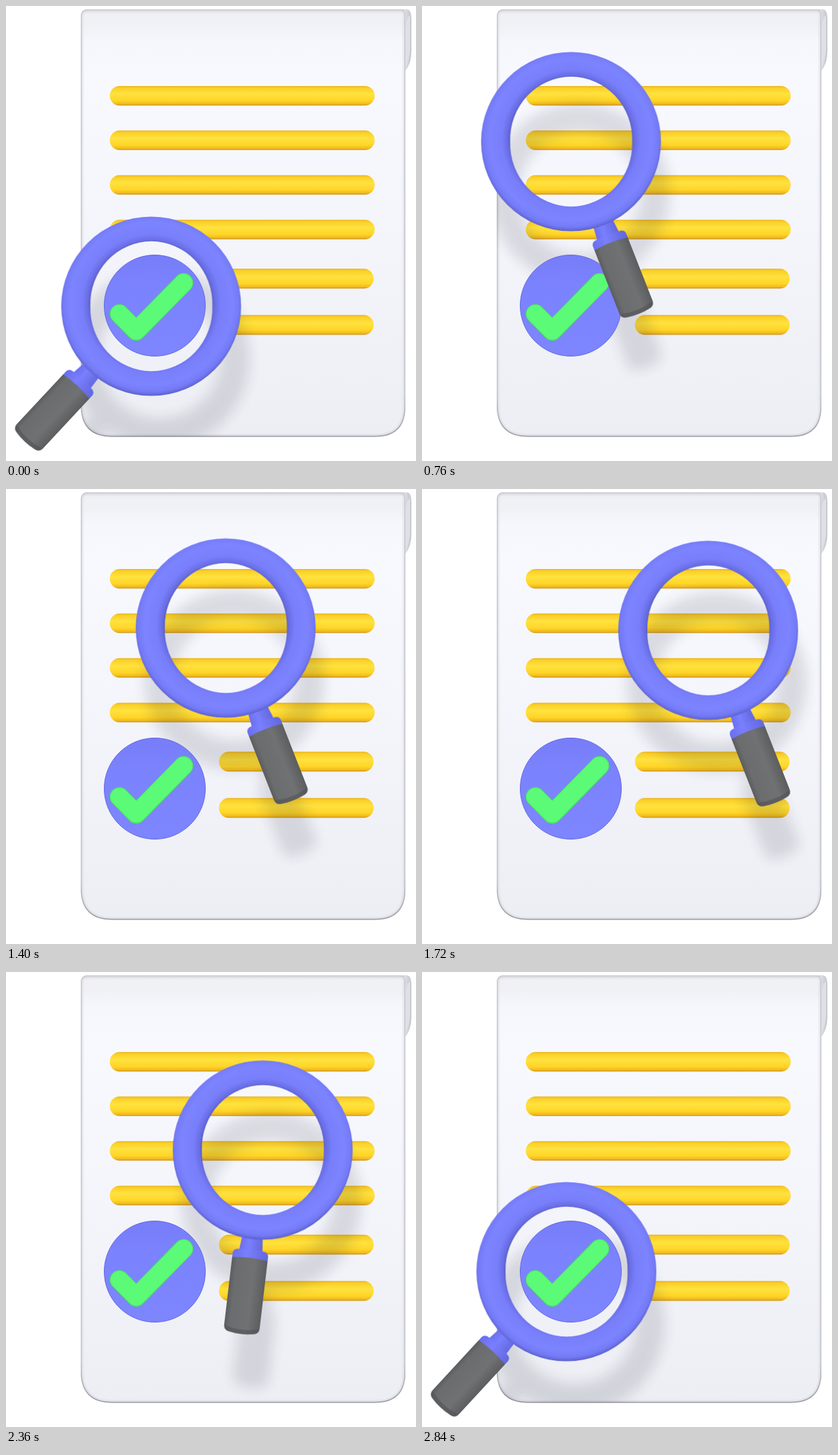
Write an HTML page that moves like this. It is 620x688 px and loops after 2880 ms.

```html
<!DOCTYPE html>
<html lang="en">
<head>
<meta charset="utf-8">
<title>Document check</title>
<style>
  html, body { margin: 0; width: 100%; height: 100%; overflow: hidden; background: #fff; }
  svg { display: block; width: 100%; height: 100%; }

  .x, .y, .turn { animation: 2880ms linear infinite; transform-origin: 0 0; }
  .x { animation-name: slide; }
  .y { animation-name: lift; }
  .turn { animation-name: turn; }

  @keyframes slide {
    0%      { transform: translateX(219.5px); animation-timing-function: cubic-bezier(.5, 0, .6, 1); }
    24.65%  { transform: translateX(225px); animation-timing-function: cubic-bezier(.615, 0, .6, 1); }
    66.667% { transform: translateX(448px); animation-timing-function: cubic-bezier(.65, 0, .6, 1); }
    100%    { transform: translateX(217.5px); }
  }
  @keyframes lift {
    0%      { transform: translateY(454px); animation-timing-function: cubic-bezier(.6, 0, .6, 1); }
    24.65%  { transform: translateY(205px); animation-timing-function: cubic-bezier(.5, 0, .6, 1); }
    66.667% { transform: translateY(214.3px); animation-timing-function: cubic-bezier(.7, 0, .6, 1); }
    100%    { transform: translateY(454px); }
  }
  @keyframes turn {
    0%      { transform: rotate(43deg); animation-timing-function: cubic-bezier(.36, 0, .64, 1); }
    24.65%  { transform: rotate(-21.4deg); }
    66.667% { transform: rotate(-21.4deg); animation-timing-function: cubic-bezier(.36, 0, .64, 1); }
    100%    { transform: rotate(43deg); }
  }
</style>
</head>
<body>
<svg viewBox="0 0 620 688">
  <defs>
    <linearGradient id="paper" x2="0" y2="1">
      <stop offset="0" stop-color="#e2e3e8"/>
      <stop offset=".012" stop-color="#f0f0f5"/>
      <stop offset=".035" stop-color="#f0f1f6"/>
      <stop offset=".075" stop-color="#f6f7fc"/>
      <stop offset=".16" stop-color="#f8f9fe"/>
      <stop offset=".55" stop-color="#f4f5fb"/>
      <stop offset="1" stop-color="#eceef4"/>
    </linearGradient>
    <linearGradient id="rim" x2="0" y2="1">
      <stop offset="0" stop-color="#cbccd2"/>
      <stop offset=".9" stop-color="#c6c7cd"/>
      <stop offset="1" stop-color="#a2a3aa"/>
    </linearGradient>
    <linearGradient id="roll">
      <stop offset="0" stop-color="#b4b5bd"/>
      <stop offset=".5" stop-color="#dddee4"/>
      <stop offset="1" stop-color="#c4c5cc"/>
    </linearGradient>
    <linearGradient id="yellow" x2="0" y2="1">
      <stop offset="0" stop-color="#e8b422"/>
      <stop offset=".1" stop-color="#fbcf26"/>
      <stop offset=".4" stop-color="#ffe23f"/>
      <stop offset=".75" stop-color="#ffd527"/>
      <stop offset=".92" stop-color="#f0b91f"/>
      <stop offset="1" stop-color="#c9921e"/>
    </linearGradient>
    <radialGradient id="torus" gradientUnits="userSpaceOnUse" cx="0" cy="-4" r="140">
      <stop offset=".64" stop-color="#5458bc"/>
      <stop offset=".69" stop-color="#6a6fe6"/>
      <stop offset=".75" stop-color="#797ffb"/>
      <stop offset=".88" stop-color="#7d84ff"/>
      <stop offset=".95" stop-color="#757bf6"/>
      <stop offset="1" stop-color="#5b60cb"/>
    </radialGradient>
    <linearGradient id="disc" x2="0" y2="1">
      <stop offset="0" stop-color="#777df8"/>
      <stop offset=".3" stop-color="#7b82fd"/>
      <stop offset="1" stop-color="#7d85ff"/>
    </linearGradient>
    <linearGradient id="neck">
      <stop offset="0" stop-color="#6a6eec"/>
      <stop offset=".4" stop-color="#797ffe"/>
      <stop offset="1" stop-color="#6267dc"/>
    </linearGradient>
    <linearGradient id="grip">
      <stop offset="0" stop-color="#5c5d5f"/>
      <stop offset=".15" stop-color="#6b6c6e"/>
      <stop offset=".65" stop-color="#707173"/>
      <stop offset="1" stop-color="#5c5d5f"/>
    </linearGradient>
    <path id="sheet" d="M123 5H596Q604 5 604 14V606Q604 651.5 558 651.5H160Q113 651.5 113 604V17Q113 5 123 5Z"/>
    <rect id="long" x="157" width="400.5" height="29.5" rx="14.75" fill="url(#yellow)"/>
    <rect id="short" x="322" width="234" height="30" rx="15" fill="url(#yellow)"/>
    <clipPath id="onSheet"><use href="#sheet"/></clipPath>
    <filter id="soft" filterUnits="userSpaceOnUse" x="-50" y="-50" width="760" height="800">
      <feGaussianBlur stdDeviation="9.5"/>
    </filter>
  </defs>

  <path d="M594 5H606Q613 5 613 20V68Q613 87 604 98H600Z" fill="url(#roll)"/>
  <path d="M604 34Q605 18 611 14V66Q610 83 604 93Z" fill="#dfe0e6"/>
  <use href="#sheet" fill="url(#paper)"/>
  <g clip-path="url(#onSheet)" fill="none">
    <use href="#sheet" stroke="#d0d1d8" stroke-opacity=".35" stroke-width="9"/>
    <use href="#sheet" stroke="url(#rim)" stroke-width="3.5"/>
  </g>

  <use href="#long" y="121"/>
  <use href="#long" y="188.3"/>
  <use href="#long" y="255.7"/>
  <use href="#long" y="323.2"/>
  <use href="#short" y="397.3"/>
  <use href="#short" y="467.3"/>

  <g clip-path="url(#onSheet)">
    <g filter="url(#soft)" opacity=".13" transform="translate(13 78)">
      <g class="x"><g class="y">
        <circle r="114" fill="none" stroke="#222430" stroke-width="44"/>
        <g class="turn">
          <rect x="-16" y="136" width="32" height="30" fill="#222430"/>
          <rect x="-27" y="160" width="54" height="122" rx="16" fill="#222430"/>
        </g>
      </g></g>
    </g>
  </g>

  <circle cx="225" cy="453" r="76.5" fill="url(#disc)" stroke="#6267df"/>
  <g fill="none" stroke-linecap="round" stroke-linejoin="round">
    <path d="M171.5 465.5L197 491.5L268.5 418.5" stroke="#4cdc68" stroke-width="29.5"/>
    <path d="M171.5 465.5L197 491L268.5 418.5" stroke="#5bfa77" stroke-width="27"/>
  </g>

  <g class="x"><g class="y">
    <g class="turn">
      <path d="M-15 126H15L18 157H-18Z" fill="url(#neck)"/>
      <path d="M-22 153Q0 149 22 153Q27 155 27 160V170H-27V160Q-27 155 -22 153Z" fill="url(#neck)"/>
      <path d="M-27 166Q0 162 27 166V269Q27 276 20 278Q0 282 -20 278Q-27 276 -27 269Z" fill="url(#grip)"/>
      <path d="M-26 270Q0 277 26 270Q26 276 20 278Q0 282 -20 278Q-26 276 -26 270Z" fill="#525355" opacity=".6"/>
    </g>
    <path fill="url(#torus)" fill-rule="evenodd"
      d="M-136 0A136 135.5 0 1 1 136 0A136 135.5 0 1 1 -136 0ZM-92 0A92.3 95 0 1 0 92.5 0A92.3 95 0 1 0 -92 0Z"/>
  </g></g>
</svg>
</body>
</html>
```
